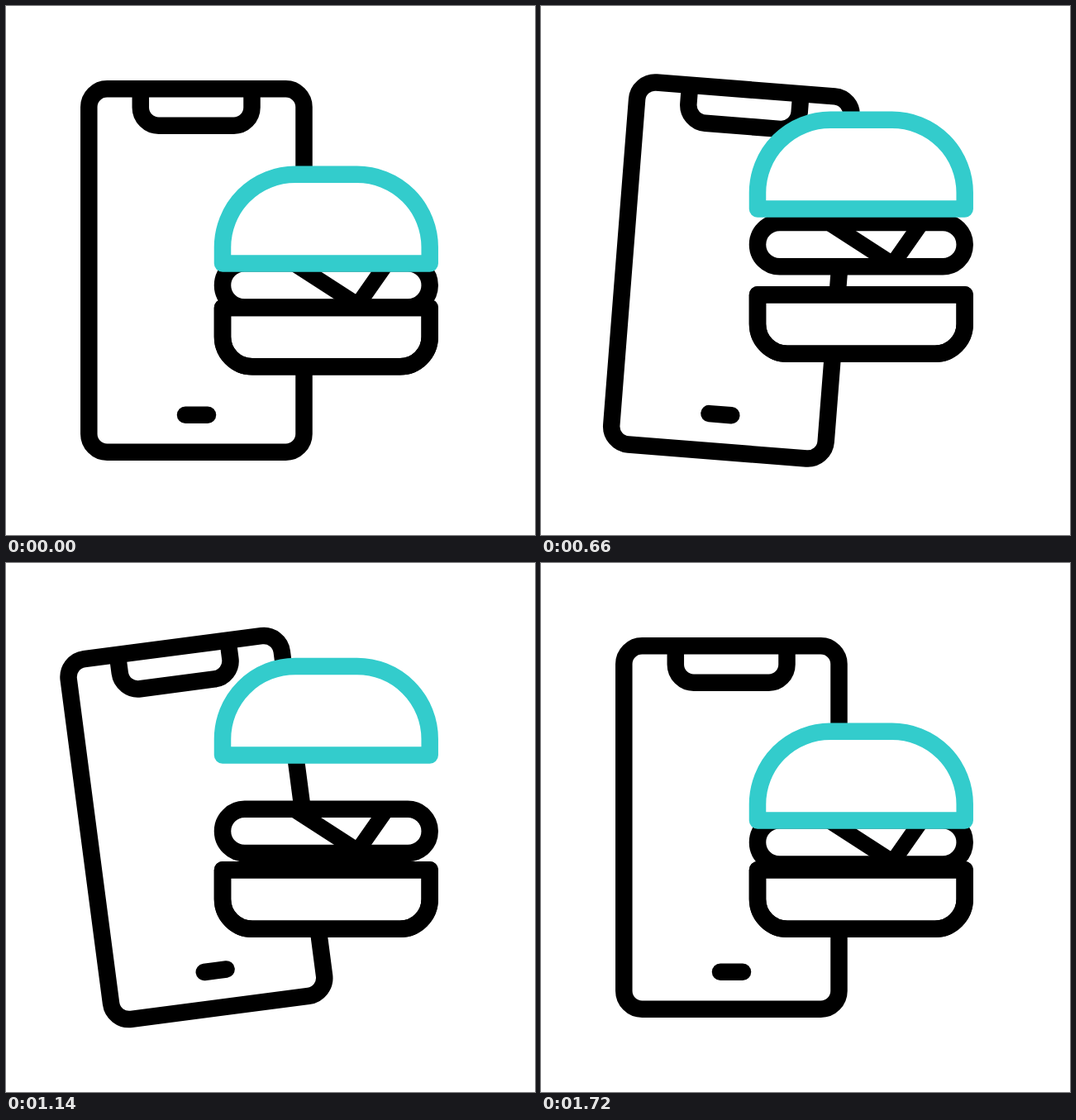
These frames come from a looping animation (640 by 640 pixels, 2000 ms). An HTML page:

```html
<!DOCTYPE html>
<html lang="en">
<head>
<meta charset="utf-8">
<title>Ordering a burger by phone</title>
<style>
  html, body { margin: 0; width: 100%; height: 100%; overflow: hidden; background: #fff; }
  svg { display: block; width: 100vw; height: 100vh; }
</style>
</head>
<body>
<svg viewBox="0 0 640 640" fill="#fff" stroke="#000" stroke-width="20.5" stroke-linejoin="round">
  <g id="phone">
    <rect x="100.3" y="100.3" width="260.2" height="439.4" rx="22"/>
    <path d="M162.8 100V122.8a22 22 0 0 0 22 22H275.5a22 22 0 0 0 22-22V100" fill="none"/>
    <path d="M217 494.7H244" stroke-linecap="round"/>
  </g>
  <path id="base" d="M262 371.3H512.7V406.7a36 36 0 0 1-36 36H298a36 36 0 0 1-36-36Z"/>
  <g id="patty">
    <rect x="262" y="311.3" width="250.7" height="53.3" rx="26.65"/>
    <path d="M347.7 311.3L425.5 361.5L460.7 311.3" fill="none" stroke-width="19"/>
  </g>
  <!-- the base outline stays visible over the patty's white -->
  <use href="#base" fill="none"/>
  <path id="bun" stroke="#3cc" d="M262 311.4V291.8a88 88 0 0 1 88-88H424.7a88 88 0 0 1 88 88V311.4Z"/>
</svg>
<script>
  const LOOP = 2000, STEP = 20;

  const smooth = u => u * u * (3 - 2 * u);
  const speedUp = u => u * u;
  const slowDown = power => u => 1 - (1 - u) ** power;
  const swing = slowDown(2.9);

  // Each move is [end time, end value, easing]; the last value holds.
  const track = (time, value, moves) => t => {
    let from = time, v = value;
    for (const [to, next, ease] of moves) {
      if (t < to) return v + (next - v) * ease(Math.max(0, (t - from) / (to - from)));
      from = to;
      v = next;
    }
    return v;
  };

  const tilt = track(0, 0, [[540, 20, swing], [1080, -10, swing], [1620, 5.7, slowDown(1.5)], [1720, 0, smooth]]);

  const lifts = {
    base: track(-198, 0, [[432, 27.4, smooth], [486, 27.4, smooth], [1093, 0, smooth]]),
    patty: track(0, 0, [[420, 21, speedUp], [760, 52, slowDown(2)], [820, 52, smooth], [1300, 0, smooth]]),
    bun: track(0, 0, [[420, 7, speedUp], [760, 81.5, smooth], [1085, 81.5, smooth], [1600, 0, smooth]])
  };

  const move = (id, value) => document.getElementById(id).setAttribute('transform', value);
  const start = performance.now();

  function draw() {
    const now = Math.max(0, performance.now() - start) % LOOP;
    const t = now - now % STEP;
    move('phone', `rotate(${tilt(t)} 230.5 320)`);
    for (const id in lifts) move(id, `translate(0 ${-lifts[id](t)})`);
    requestAnimationFrame(draw);
  }
  draw();
</script>
</body>
</html>
```
